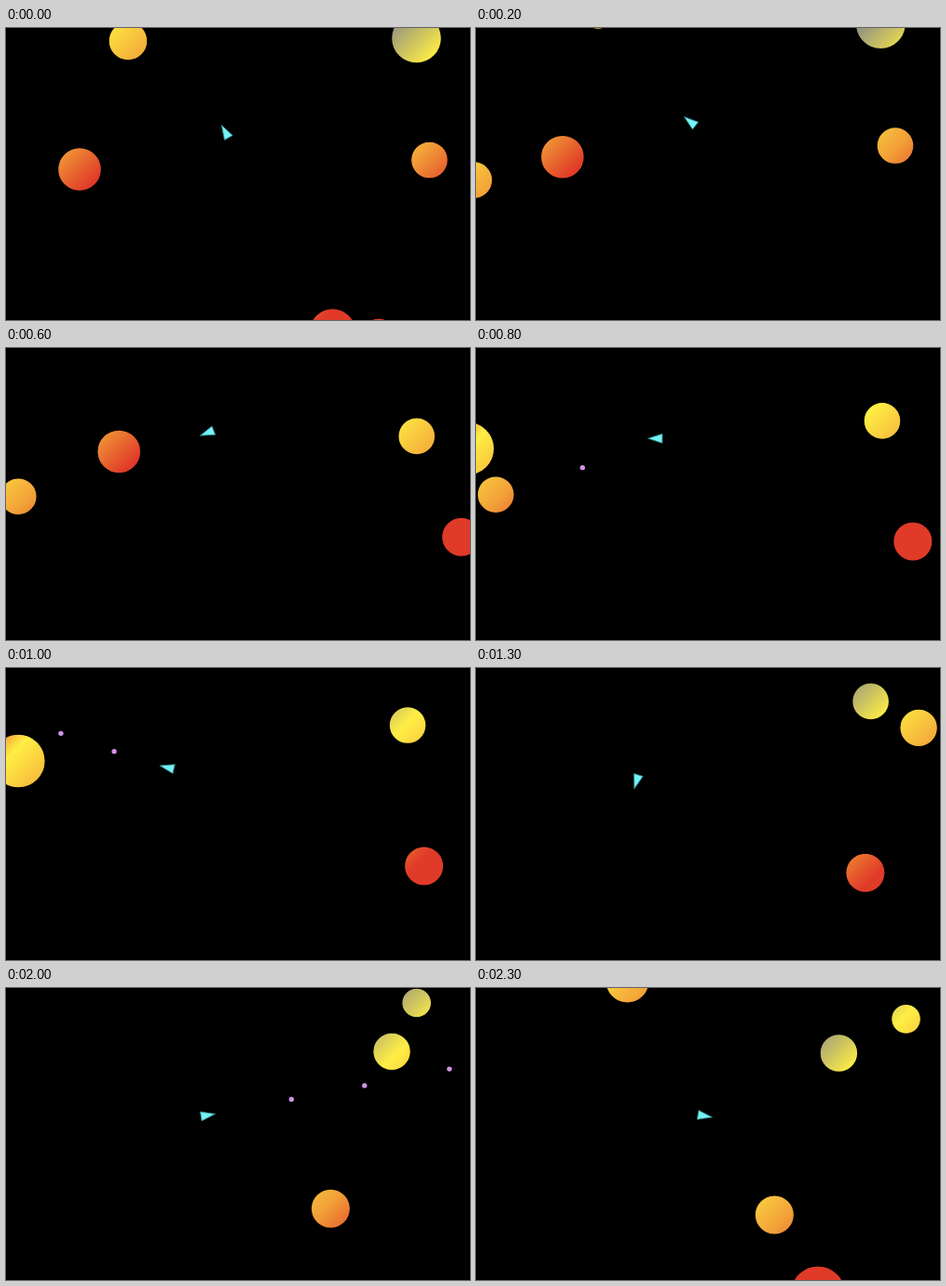
An HTML page with a canvas that plays this animation: 498 px wide and 314 px high, repeating every 2400 ms.

```html
<!DOCTYPE html>
<html lang="en">
<head>
<meta charset="utf-8">
<title>Asteroid shooter</title>
<style>
  html, body { margin: 0; width: 100%; height: 100%; overflow: hidden; background: #000; }
  canvas { display: block; }
</style>
</head>
<body>
<canvas id="stage" width="498" height="314"></canvas>
<script>
const ctx = document.getElementById('stage').getContext('2d');
const LOOP = 2400, STEP = 100, BULLET_SPEED = 0.9, BULLET_SIZE = 2.7, NOSE = 9;

// One diagonal gradient spans the stage and repeats; rocks are windows onto it.
const YELLOW = '#ffee44', ORANGE = '#f2a038', RED = '#e03a28', GREY = '#8f8f84';
const paint = ctx.createLinearGradient(0, 0, 406, 406);
const addStop = (sum, color) => paint.addColorStop(sum / 812, color);
addStop(70, ORANGE);
for (const from of [98, 490]) {
  addStop(from, YELLOW);
  addStop(from + 90, ORANGE);
  addStop(from + 162, RED);
  addStop(from + 235, RED);
  if (from === 98) addStop(from + 310, GREY);
}

// Rocks drift in straight lines: x, y, vx, vy, radius, optional birth
const rocks = [
  [79, 152, 7.4, -7.1, 22.5],
  [131, 14, 0, -18, 20],
  [440.5, 11, -3.3, -8.2, 26],
  [350.5, 326.5, -2, 6.4, 24],
  [400, 330, 2, 6, 17],
  [454.5, 142, -2.4, -8.25, 19],
  [-9.6, 165.4, 4, -1, 19, 100],
  [545.2, 189.5, -9.9, 2.4, 20.2],
  [-94, 139, 11, -4, 28],
  [587, 57, -8.7, 0.57, 19.4, 1100],
  [294.6, -105.2, 7.35, 6.1, 15],
  [162.5, -143.7, 0, 6, 22.7],
  [367, 464.5, 0, -6, 28.5]
].map(([x, y, vx, vy, r, birth = 0]) => ({ x, y, vx, vy, r, birth, end: LOOP }));

// The game runs slightly unevenly against real time.
const clock = t => t / 101.5 - 0.2 * Math.sin(2 * Math.PI * t / LOOP);

function rockAt(rock, t) {
  const u = clock(t);
  return [rock.x + rock.vx * u, rock.y + rock.vy * u];
}

// Ship: time, x, y along its drift
const path = [
  [0, 235.7, 112.3], [200, 230.4, 101], [600, 216.8, 91], [1000, 173.8, 107.1],
  [1600, 182.6, 133.5], [2000, 215.7, 136.9], [2300, 244.6, 137.5]
];
// Turns: start, end, degrees
const turns = [[50, 600, -82], [700, 860, 34.5], [1040, 1650, -203], [2000, 2300, 19]];

function heading(t) {
  const degrees = turns.reduce((sum, [from, to, turn]) =>
    sum + turn * Math.min(Math.max((t - from) / (to - from), 0), 1), -119);
  return degrees * Math.PI / 180;
}

// Cubic through the path, with tangents taken from the neighbouring points
function drift(t, k) {
  const last = path.length - 1;
  let i = 0;
  while (i < last - 1 && t > path[i + 1][0]) i++;
  const a = path[i], b = path[i + 1], span = b[0] - a[0];
  const slope = j => {
    const p = path[Math.max(j - 1, 0)], n = path[Math.min(j + 1, last)];
    return (n[k] - p[k]) / (n[0] - p[0]) * span;
  };
  const s = (t - a[0]) / span, r = 1 - s;
  return r * r * ((1 + 2 * s) * a[k] + s * slope(i)) + s * s * ((3 - 2 * s) * b[k] - r * slope(i + 1));
}

// Bullets leave the nose along the heading at these times.
const bullets = [620, 700, 866, 940, 1040, 1685, 1798, 1897].map(birth => ({ birth, end: LOOP }));

function bulletAt({ birth }, t) {
  const angle = heading(birth), d = NOSE + (t - birth) * BULLET_SPEED;
  return [drift(birth, 1) + d * Math.cos(angle), drift(birth, 2) + d * Math.sin(angle)];
}

const alive = (thing, t) => t >= thing.birth && t < thing.end;

// A hit removes both the bullet and the rock.
for (let t = 0; t < LOOP; t += 5) {
  for (const bullet of bullets) {
    for (const rock of rocks) {
      if (!alive(bullet, t) || !alive(rock, t)) continue;
      const [bx, by] = bulletAt(bullet, t), [x, y] = rockAt(rock, t);
      if (Math.hypot(bx - x, by - y) < rock.r + BULLET_SIZE) bullet.end = rock.end = t;
    }
  }
}

function disc([x, y], r) {
  ctx.beginPath();
  ctx.arc(x, y, r, 0, 2 * Math.PI);
  ctx.fill();
}

function drawShip(t) {
  ctx.save();
  ctx.translate(drift(t, 1), drift(t, 2));
  ctx.rotate(heading(t));
  ctx.beginPath();
  ctx.moveTo(NOSE, 0);
  ctx.lineTo(-6.5, -5);
  ctx.lineTo(-6.5, 5);
  ctx.closePath();
  ctx.fillStyle = '#74f2f4';
  ctx.fill();
  ctx.strokeStyle = '#2f8086';
  ctx.lineWidth = 0.8;
  ctx.stroke();
  ctx.restore();
}

function draw(t) {
  ctx.fillStyle = '#000';
  ctx.fillRect(0, 0, 498, 314);

  ctx.fillStyle = paint;
  ctx.strokeStyle = '#000';
  ctx.lineWidth = 1.2;
  for (const rock of rocks) {
    if (!alive(rock, t)) continue;
    disc(rockAt(rock, t), rock.r + 0.9);
    ctx.stroke();
  }

  ctx.fillStyle = '#d292e2';
  for (const bullet of bullets) {
    if (alive(bullet, t)) disc(bulletAt(bullet, t), BULLET_SIZE);
  }

  drawShip(t);
}

const start = performance.now();
function tick() {
  const t = (performance.now() - start) % LOOP;
  draw(Math.floor(t / STEP) * STEP);
  requestAnimationFrame(tick);
}
tick();
</script>
</body>
</html>
```
